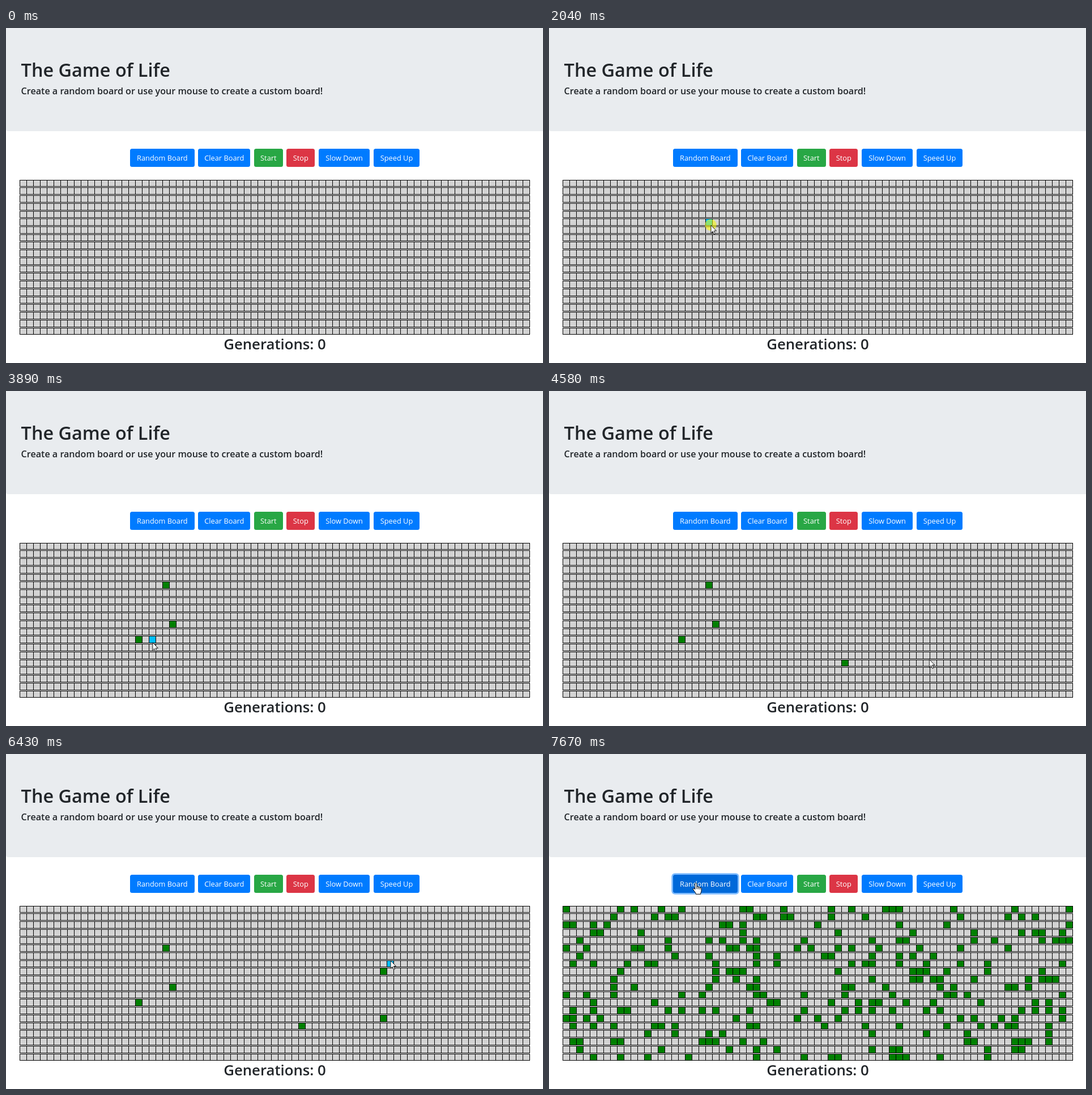
Write an HTML page that moves like this. It is 948 px wide and 591 px high and loops after 8000 ms.

```html
<!DOCTYPE html>
<html lang="en">
<head>
<meta charset="utf-8">
<title>The Game of Life</title>
<style>
  html, body { margin: 0; width: 100%; height: 100%; overflow: hidden; background: #fff; }
  svg { display: block; width: 948px; height: 591px; }
  text { font-family: "Open Sans", "Noto Sans", sans-serif; fill: #212529; }
  .head { font-weight: 600; }
  .label { font-size: 12.8px; font-weight: 500; fill: #fff; text-anchor: middle; }
  .crisp { shape-rendering: crispEdges; }
</style>
</head>
<body>
<svg viewBox="0 0 948 591">
  <rect x="0" y="-10" width="960" height="192" rx="4" fill="#e9ecef"/>
  <text class="head" x="26.6" y="86" font-size="32.4">The Game of Life</text>
  <text class="head" x="26.6" y="117" font-size="16.13">Create a random board or use your mouse to create a custom board!</text>
  <rect id="ring" x="216.3" y="210.3" width="119.4" height="37.4" rx="6" fill="#007bff"/>
  <g id="buttons"></g>
  <g id="grid" class="crisp"></g>
  <g id="cells" class="crisp"></g>
  <text class="head" x="474.5" y="567" font-size="25.75" text-anchor="middle">Generations: 0</text>
  <circle id="halo" r="10.2" fill="#ff0" fill-opacity=".55"/>
  <g id="pointer" fill="#fff" stroke="#000" stroke-linejoin="round">
    <path id="arrow" stroke-width=".9" d="M.4.5V14.2L3.5 11.3 5.8 16.4 7.9 15.5 5.7 10.4H9.9Z"/>
    <path id="hand" d="M-1.2 1.1C-1.2-.9 2-.9 2 1.1V6.6C2.5 5.4 4.7 5.6 4.8 7.1 5.5 6.1 7.4 6.4 7.5 7.9 8.3 7.1 10 7.6 10 9.2V13.4C10 15.4 8.6 16.3 8.6 19.3H.3C.3 16.4-2.6 14.4-4.6 10.9-5.4 9.2-3.2 8.2-2.1 9.7L-1.2 11Z M2 6.6V10.4M4.8 7.1V10.6M7.5 7.9V10.9"/>
  </g>
</svg>
<script>
const LOOP = 8000, STEP = 76.5, PRESS = 155;
const COLS = 75, ROWS = 20, CELL = 12, PITCH = 13.74, LEFT = 24, TOP = 267.55;
const $ = id => document.getElementById(id);
const mix = (a, b, u) => a + (b - a) * u;
const ease = u => u * u * (3 - 2 * u);

function add(parent, tag, attrs, text) {
  const el = document.createElementNS("http://www.w3.org/2000/svg", tag);
  for (const key in attrs) el.setAttribute(key, attrs[key]);
  if (text) el.textContent = text;
  return parent.appendChild(el);
}

// Buttons stand in a row with equal gaps.
const hoverFill = { "#007bff": "#0069d9", "#28a745": "#218838", "#dc3545": "#c82333" };
const buttons = [];
function addButton(label, width, fill = "#007bff") {
  const last = buttons[buttons.length - 1];
  const left = last ? last.right + 6.75 : 219.2, right = left + width;
  const x = Math.round(left);
  const el = add($("buttons"), "rect", { x, y: 213, width: Math.round(right) - x, height: 32, rx: 3.5, fill });
  add($("buttons"), "text", { class: "label", x: (left + right) / 2, y: 234 }, label);
  buttons.push({ el, left, right, fill });
}
addButton("Random Board", 113.4);
addButton("Clear Board", 91.9);
addButton("Start", 50.6, "#28a745");
addButton("Stop", 50, "#dc3545");
addButton("Slow Down", 90);
addButton("Speed Up", 81.3);

// Rows snap to whole pixels and keep a gap of one pixel.
const rowTop = row => Math.round(TOP + PITCH * row);
const rowHeight = row => rowTop(row + 1) - rowTop(row) - 1;

function paint(col, row, fill, parent = $("cells")) {
  add(parent, "rect", {
    x: LEFT + 1 + col * CELL, y: rowTop(row) + 1,
    width: CELL - 1, height: rowHeight(row) - 2, fill
  });
}

for (let row = 0; row < ROWS; row++) {
  add($("grid"), "rect", { x: LEFT, y: rowTop(row), width: COLS * CELL + 1, height: rowHeight(row) });
  for (let col = 0; col < COLS; col++) paint(col, row, "#d3d3d3", $("grid"));
}

function cellAt([x, y]) {
  const col = Math.floor((x - LEFT) / CELL), row = Math.floor((y - TOP) / PITCH);
  const inside = col >= 0 && col < COLS && row >= 0 && row < ROWS;
  return inside && y < rowTop(row) + rowHeight(row) ? [col, row] : null;
}

function randomBoard(seed, density) {
  const live = [];
  for (let i = 0; i < COLS * ROWS; i++) {
    seed = (Math.imul(seed, 1664525) + 1013904223) >>> 0;
    if (seed / 2 ** 32 < density) live.push([i % COLS, Math.floor(i / COLS)]);
  }
  return live;
}

// Pointer moves: first and last step time, end point, optional bend.
const entry = [856, 595];
const moves = [
  [730, 1110, [831, 575], [812, 550]],
  [1430, 1900, [285.5, 347.5], [400, 203]],
  [2210, 2450, [288.4, 410.4]],
  [2810, 3120, [223.7, 431.3]],
  [3270, 3570, [228.4, 438.5]],
  [3890, 4200, [518.2, 484.6]],
  [4510, 4580, [671, 473.1]],
  [4660, 4660, [671, 472.4]],
  [5040, 5190, [670.5, 464], [671, 446]],
  [5360, 5970, [664.5, 381], [684, 420]],
  [6430, 6430, [678.6, 364]],
  [6510, 6970, [259, 228], [-20, 60]]
];

function tipAt(t) {
  let from = entry;
  for (const [start, end, to, bend] of moves) {
    if (t < start) break;
    const steps = Math.round((end - start) / STEP) + 1;
    const step = t >= end ? steps : 1 + Math.floor((t - start) / (end - start) * (steps - 1));
    if (step < steps) {
      const u = ease(step / steps);
      return to.map((end, i) => {
        const via = bend ? bend[i] : mix(from[i], end, 0.5);
        return mix(mix(from[i], via, u), mix(via, end, u), u);
      });
    }
    from = to;
  }
  return from;
}

// Each press on a cell turns it on; the last press is on the button.
const presses = [2040, 2660, 3120, 3570, 4350, 4660, 6130, 7370];
const clicks = presses.map(time => ({ time, cell: cellAt(tipAt(time)) })).filter(c => c.cell);
const focusAt = presses[presses.length - 1], boardAt = focusAt + STEP;
const board = randomBoard(2024, 0.205);

let drawn = "";
function drawCells(t, hover) {
  const live = t >= boardAt ? board : clicks.filter(c => t >= c.time).map(c => c.cell);
  const key = live.length + "/" + hover;
  if (key === drawn) return;
  drawn = key;
  $("cells").replaceChildren();
  for (const [col, row] of live) paint(col, row, "#008000");
  if (hover) paint(...hover, "#00bfff");
}

const show = (el, on) => el.setAttribute("visibility", on ? "visible" : "hidden");

function draw(t) {
  const tip = tipAt(t), [x, y] = tip, visible = t >= moves[0][0];
  drawCells(t, visible ? cellAt(tip) : null);

  const over = buttons.find(b => x > b.left && x < b.right && y > 213 && y < 245);
  for (const b of buttons) b.el.setAttribute("fill", b === over ? hoverFill[b.fill] : b.fill);
  $("ring").setAttribute("opacity", 0.5 * Math.min(1, Math.max(0, (t - focusAt) / 150)));

  const at = `translate(${x.toFixed(1)} ${y.toFixed(1)})`;
  $("pointer").setAttribute("transform", at);
  $("halo").setAttribute("transform", at);
  show($("arrow"), visible && !over);
  show($("hand"), visible && over);
  show($("halo"), presses.some(p => t >= p && t < p + PRESS));
}

const begin = performance.now();
function tick() {
  draw((performance.now() - begin) % LOOP);
  requestAnimationFrame(tick);
}
tick();
</script>
</body>
</html>
```
